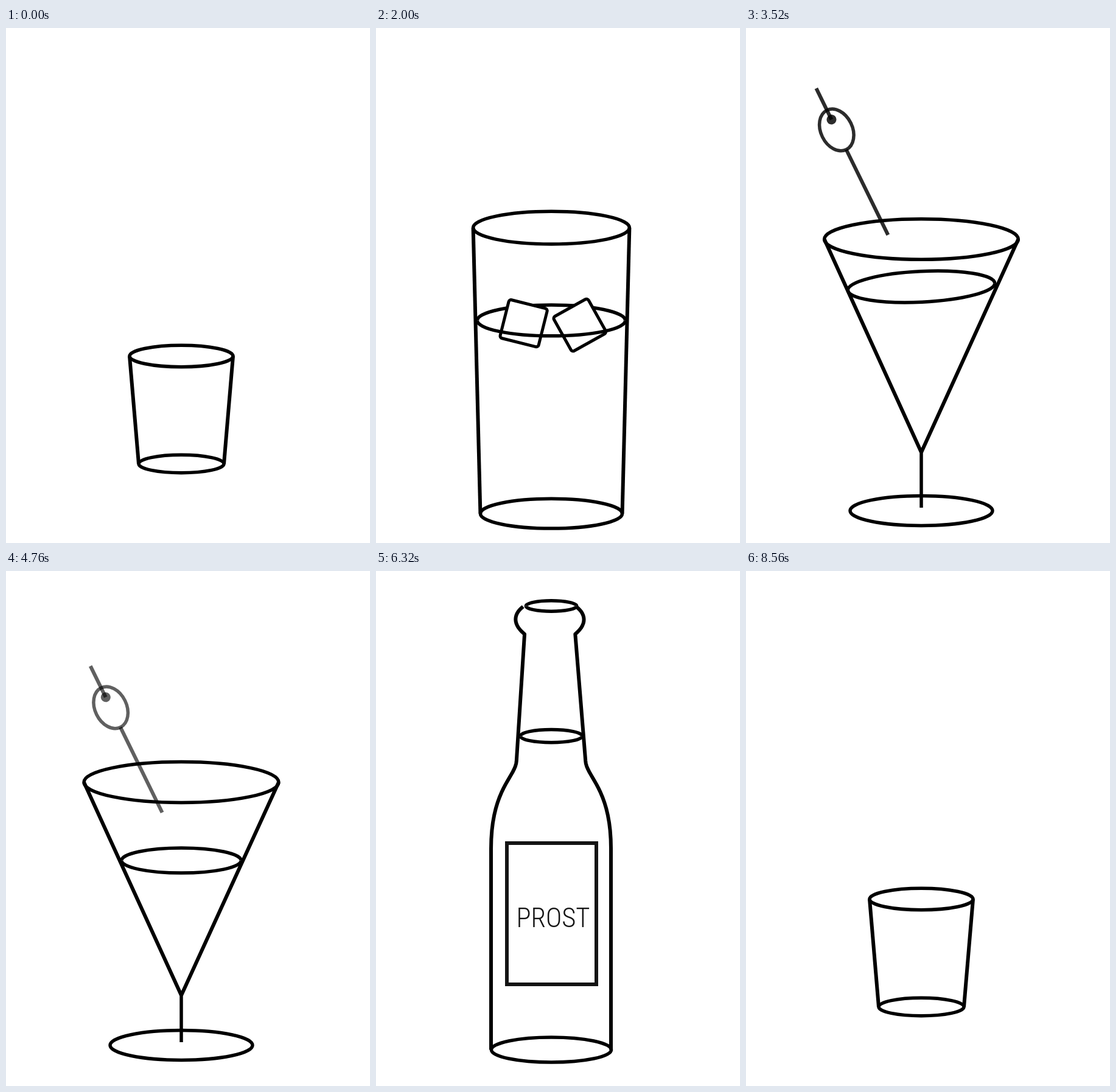
An HTML page with a canvas that plays this animation: 598 px wide and 846 px high, repeating every 8.8 s.

```html
<!DOCTYPE html>
<html lang="de">
<head>
<meta charset="utf-8">
<title>Prost</title>
<style>
  html, body { margin: 0; width: 100%; height: 100%; overflow: hidden; background: #fff; }
  canvas { display: block; width: 598px; height: 846px; }
</style>
</head>
<body>
<canvas id="stage" width="598" height="846"></canvas>
<script>
const ctx = document.getElementById('stage').getContext('2d');
const LOOP = 8800, STEP = 40, CX = 288, FLAT = 0.209, LINE = 5.5;
const FACE = "'Roboto Condensed', 'Open Sans Condensed', 'Liberation Sans Narrow', Roboto, sans-serif";

const mix = (a, b, k) => a + (b - a) * k;
const ramp = (t, from, to) => Math.min(1, Math.max(0, (t - from) / (to - from)));
const ease = p => (1 - Math.cos(Math.PI * p)) / 2;
const glide = (t, from, to) => ease(ramp(t, from, to));

// Value at time t on a list of [time, value] pairs, eased between them.
function track(t, keys) {
  let v = keys[0][1];
  for (let i = 1; i < keys.length; i++)
    v = mix(v, keys[i][1], glide(t, keys[i - 1][0], keys[i][0]));
  return v;
}

// Each pose: rim y, rim rx, base y, base rx, foot y, foot half-width, neck.
const straight = (rimY, rimRx, y, rx) => [rimY, rimRx, y, rx, y, rx, 0];
const SHOT = straight(539, 85, 716, 70);
const TUMBLER = straight(484, 126, 754, 108);
const TALL = straight(320, 128.5, 800, 117);
const CONE = [347, 159, 800, 117, 697, 0, 0];
const MARTINI = [347, 160, 779, 117, 697, 0, 0];
const CAN = straight(530, 101, 786.5, 98.5);
const BOTTLE = [44, 40, 786.5, 98.5, 786.5, 98.5, 1];
const STUMP = straight(548, 98.5, 786.5, 98.5);

const MOVES = [
  [560, 960, TUMBLER], [1520, 2080, TALL], [2960, 3460, CONE], [3300, 3860, MARTINI],
  [5300, 5660, CAN], [5650, 6400, BOTTLE], [7760, 8090, STUMP], [8090, 8560, SHOT]
];

function poseAt(t) {
  let p = SHOT;
  for (const [from, to, next] of MOVES) {
    const k = glide(t, from, to);
    p = p.map((v, i) => mix(v, next[i], k));
  }
  const [rimY, rimRx, baseY, baseRx, footY, footRx, neck] = p;
  return { rimY, rimRx, baseY, baseRx, footY, footRx, neck };
}

function curve(a, b, c, d, n) {
  return Array.from({ length: n + 1 }, (_, i) => {
    const t = i / n, u = 1 - t;
    return [0, 1].map(j =>
      u * u * u * a[j] + 3 * u * u * t * b[j] + 3 * u * t * t * c[j] + t * t * t * d[j]);
  });
}

const NECK = [
  ...curve([42, 45], [58, 57], [61, 74], [40, 91], 14),
  ...curve([55.5, 303], [57, 330], [98.5, 350], [98.5, 450], 18)
];

// Wall outline as [half-width, y], top to bottom.
function wallOf(g) {
  const foot = [g.footRx, g.footY];
  if (g.neck < 0.001) return [[g.rimRx, g.rimY], foot];
  const points = NECK.map(([w, y]) => {
    const flatY = 530 + (y - 45) * 0.35;
    return [mix(98.5, w, g.neck), mix(flatY, y, g.neck)];
  });
  return [...points, foot];
}

function widthAt(wall, y) {
  for (let i = 1; i < wall.length; i++) {
    const [w0, y0] = wall[i - 1], [w1, y1] = wall[i];
    if (y <= y1) return mix(w0, w1, ramp(y, y0, y1));
  }
  return wall[wall.length - 1][0];
}

function arc(x, y, rx, ry, turn = 0, from = 0, to = 2 * Math.PI) {
  ctx.beginPath();
  ctx.ellipse(x, y, Math.max(0, rx), Math.max(0, ry), turn, from, to);
  ctx.stroke();
}
const back = (y, rx, turn) => arc(CX, y, rx, rx * FLAT, turn, Math.PI, 2 * Math.PI);
const front = (y, rx, turn) => arc(CX, y, rx, rx * FLAT, turn, 0, Math.PI);

function line(...pts) {
  ctx.beginPath();
  pts.forEach(([x, y]) => ctx.lineTo(x, y));
  ctx.stroke();
}

function disc(r, color) {
  ctx.fillStyle = color;
  ctx.beginPath();
  ctx.arc(0, 0, r, 0, 2 * Math.PI);
  ctx.fill();
}

function at(x, y, turn, alpha, draw) {
  if (alpha <= 0) return;
  ctx.save();
  ctx.globalAlpha = alpha;
  ctx.translate(x, y);
  ctx.rotate(turn);
  draw();
  ctx.restore();
}
const rad = deg => deg * Math.PI / 180;

// The bottle neck leans slightly to the left towards its mouth.
function drawWalls(wall, neck) {
  ctx.lineWidth = 6;
  for (const side of [-1, 1])
    line(...wall.map(([w, y]) => [CX - neck * (0.5 + 2.5 * ramp(y, 300, 40)) + side * w, y]));
}

function drawCubes(t, level) {
  const lift = glide(t, 2780, 3120);
  const settle = glide(t, 1520, 2080);
  [
    { start: 940, x: [215, 235, 243], dy: [0, 5], turn: [16, 14], spin: -70 },
    { start: 1000, x: [372, 340, 334.5], dy: [8, 7.5], turn: [-32.5, -29], spin: 80 }
  ].forEach(c => {
    const fall = ramp(t, c.start, c.start + 320) ** 2;
    const alpha = ramp(t, c.start, c.start + 120) * (1 - ramp(t, 2860, 3120));
    const x = mix(mix(c.x[0], c.x[1], fall), c.x[2], settle);
    const y = mix(228, level + mix(...c.dy, settle), fall) - 220 * lift;
    const turn = mix(...c.turn, settle) + c.spin * (1 - fall) - c.spin * lift * 0.5;
    at(x, y, rad(turn), alpha, () => {
      ctx.lineWidth = 5;
      ctx.fillStyle = '#fff';
      ctx.beginPath();
      ctx.roundRect(-32.5, -32.5, 65, 65, 4);
      ctx.fill();
      ctx.stroke();
    });
  });
}

function drawLemon(t) {
  const come = glide(t, 2040, 2440), go = glide(t, 2770, 3180);
  const x = mix(mix(458, 398, come), 485, go);
  const y = mix(mix(153, 304, come), 157, go);
  const alpha = ramp(t, 2040, 2240) * (1 - ramp(t, 2940, 3180));
  at(x, y, rad(-6 + 60 * (1 - come) + 60 * go), alpha, () => {
    disc(81, '#000');
    disc(71.5, '#fff');
    disc(60, '#000');
    ctx.strokeStyle = '#fff';
    ctx.lineWidth = 5.5;
    for (let i = 0; i < 8; i++) {
      const a = i * Math.PI / 4;
      line([0, 0], [62 * Math.cos(a), 62 * Math.sin(a)]);
    }
    disc(12.5, '#fff');
  });
}

// Olive on a stick, drawn along the x axis from its upper end.
function drawPick(t) {
  const come = glide(t, 3290, 3770), go = glide(t, 4550, 4960);
  const x = mix(mix(64, 174, come), 106, go);
  const y = mix(mix(16, 194, come), 121, go);
  const alpha = ramp(t, 3280, 3570) * (1 - ramp(t, 4640, 4960));
  at(x, y, rad(63.9), alpha, () => {
    ctx.lineWidth = 6;
    line([0, 0], [57, 0]);
    line([112, 0], [268, 0]);
    ctx.lineWidth = 5.5;
    arc(76, 0, 36, 26);
    ctx.translate(57, 0);
    disc(8, '#000');
  });
}

function drawLabel(t) {
  const alpha = ramp(t, 6080, 6340) * (1 - ramp(t, 7640, 7880));
  at(288.5, 563, 0, alpha, () => {
    ctx.lineWidth = 6;
    ctx.lineJoin = 'miter';
    ctx.strokeRect(-73.5, -116, 147, 232);
    const word = 'PROST';
    const font = size => `300 extra-condensed ${size}px ${FACE}`;
    ctx.font = font(100);
    ctx.font = font(Math.min(75, 100 * 121 / ctx.measureText(word).width));
    ctx.textAlign = 'center';
    const box = ctx.measureText(word);
    ctx.fillStyle = '#000';
    ctx.fillText(word, 2.5, 6 + (box.actualBoundingBoxAscent - box.actualBoundingBoxDescent) / 2);
  });
}

const LEVEL = [
  [880, 754], [1240, 662], [1520, 662], [2080, 471], [2960, 471], [3460, 425], [4550, 425],
  [5290, 697], [5480, 786], [5700, 613], [6440, 248], [7200, 248], [8110, 786.5]
];

function slosh(t) {
  return [1280, 3440].reduce((sum, start) => {
    const p = ramp(t, start, start + 520);
    return sum - rad(3.5) * (1 - p) * Math.sin(4 * Math.PI * p);
  }, 0);
}

function draw(t) {
  ctx.fillStyle = '#fff';
  ctx.fillRect(0, 0, 598, 846);
  ctx.strokeStyle = '#000';
  ctx.lineJoin = 'round';

  const g = poseAt(t), wall = wallOf(g);
  drawWalls(wall, g.neck);
  ctx.lineWidth = LINE;
  arc(CX, g.baseY, g.baseRx, g.baseRx * FLAT);
  if (g.baseY - g.footY > 6) line([CX, g.footY], [CX, g.baseY - 5]);
  back(g.rimY, g.rimRx);

  const level = Math.min(track(t, LEVEL), g.footY);
  const wet = (t > 880 && t < 5290) || (t > 5500 && t < 8110);
  const rx = widthAt(wall, level) - 3;
  const tilt = slosh(t);
  const filled = wet && rx > 2;
  if (filled) back(level, rx, tilt);
  drawCubes(t, level);
  ctx.lineWidth = LINE;
  if (filled) front(level, rx, tilt);

  drawLabel(t);
  drawLemon(t);
  drawPick(t);
  ctx.lineWidth = LINE;
  front(g.rimY, g.rimRx);
}

const start = performance.now();
function tick() {
  const t = (performance.now() - start) % LOOP;
  draw(Math.floor(t / STEP) * STEP);
  requestAnimationFrame(tick);
}
tick();
</script>
</body>
</html>
```
